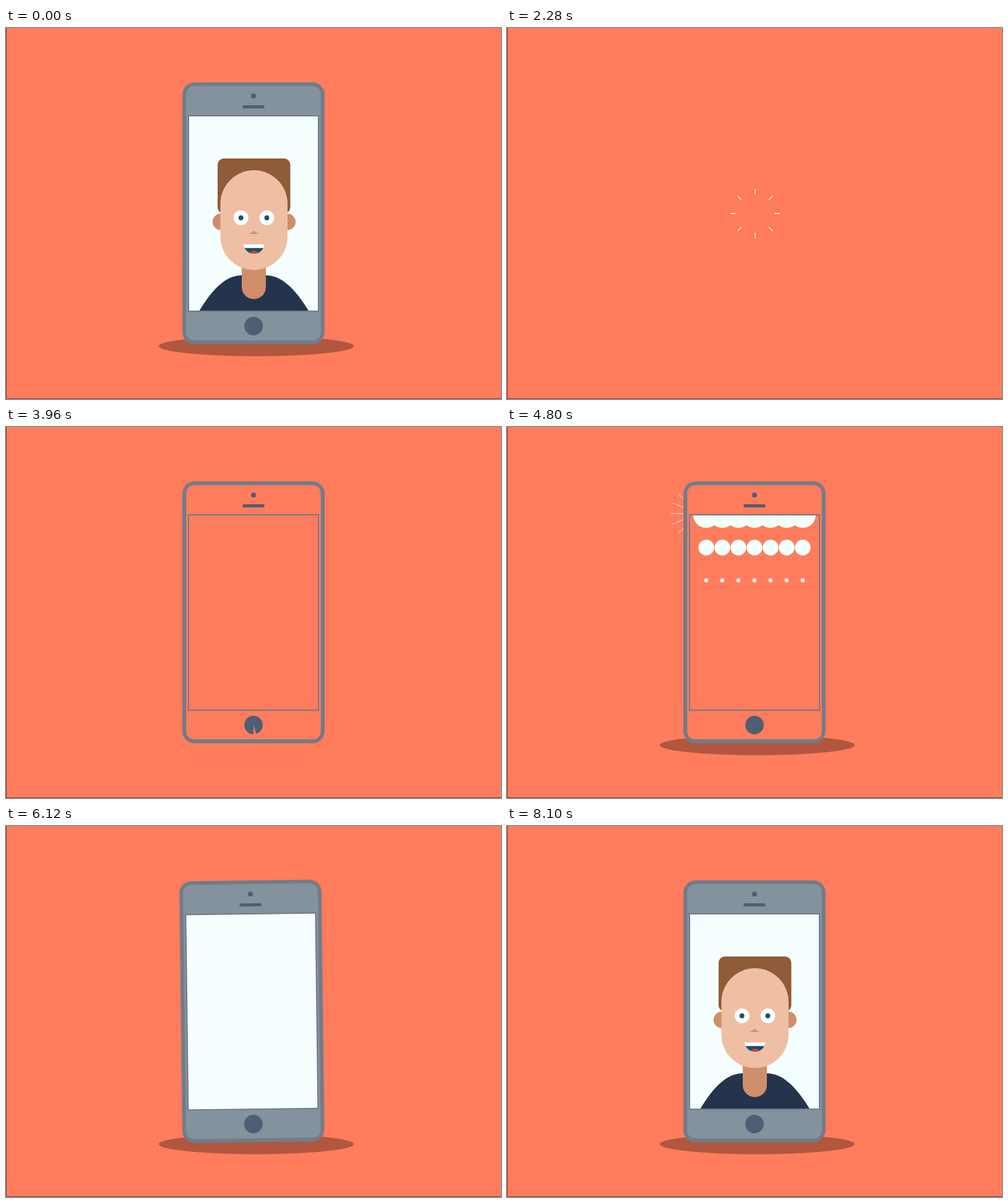
An HTML page without scripts that plays this animation: 800x600 px, repeating every 8.13 s.

```html
<!DOCTYPE html>
<html lang="en">
<head>
<meta charset="utf-8">
<title>Phone selfie loop</title>
<style>
html, body { margin: 0; width: 100%; height: 100%; overflow: hidden; background: #ff7c5c; }
svg { display: block; width: 800px; height: 600px; }
svg * { animation-duration: 8130ms; animation-iteration-count: infinite; animation-timing-function: linear; }
.line { fill: none; stroke: #707c89; }
.part { fill: #4d5f74; }

/* phone: crouch, launch, reset, hop */
#phone { transform-origin: 400px 511px; animation-name: phone; }
@keyframes phone {
  0%, 4.8% { transform: translateY(0) rotate(0deg); animation-timing-function: ease-in-out; }
  10.4% { transform: translateY(17px) rotate(0deg); animation-timing-function: ease-in; }
  13.28% { transform: translateY(-402px) rotate(0deg); }
  14.2%, 27% { transform: translateY(-560px) rotate(0deg); }
  27.01%, 63% { transform: translateY(0) rotate(0deg); }
  64.94% { transform: translateY(0) rotate(.2deg); }
  68.3% { transform: translateY(0) rotate(.5deg); animation-timing-function: ease-out; }
  71.3% { transform: translateY(-20px) rotate(4.6deg); animation-timing-function: ease-in-out; }
  74.4% { transform: translateY(0) rotate(-1.6deg); animation-timing-function: ease-in-out; }
  76.5% { transform: translateY(0) rotate(.8deg); }
  78.6%, 100% { transform: translateY(0) rotate(0deg); }
}
#shadow { transform-origin: 404.5px 514.5px; animation-name: shadow; }
@keyframes shadow {
  0%, 10.4% { transform: scale(1); animation-timing-function: ease-in; }
  13.28% { transform: scale(.226); }
  14%, 52% { transform: scale(0); animation-timing-function: ease-out; }
  57.8%, 100% { transform: scale(1); }
}

/* outlines */
#dashes { stroke-width: 5.6px; animation-name: dashes; }
@keyframes dashes {
  0%, 18.4% { stroke-dasharray: 20 0; }
  18.45%, 31% { stroke-dasharray: 0 20; }
  34.69% { stroke-dasharray: 10 10; }
  37.2%, 100% { stroke-dasharray: 20 0; }
}
#inner { transform-origin: 400px 300px; stroke-width: 4.6px; animation-name: inner; }
@keyframes inner {
  0%, 18.4% { stroke-dasharray: 1 2; stroke-dashoffset: 0; transform: scale(1.014, 1.014); }
  18.45%, 28% { stroke-dasharray: 1 2; stroke-dashoffset: 1.01; transform: scale(1); animation-timing-function: ease-in-out; }
  34.3%, 34.69% { stroke-dasharray: 1 2; stroke-dashoffset: 0; transform: scale(1); }
  37.2%, 100% { stroke-dasharray: 1 2; stroke-dashoffset: 0; transform: scale(1.014, 1.014); }
}
#echo { transform-origin: 400px 300px; opacity: 0; animation-name: echo; }
@keyframes echo {
  0%, 33.2% { opacity: 0; stroke-width: .3px; transform: rotate(28deg) scale(.3); }
  33.21% { opacity: 1; stroke-width: .3px; transform: rotate(28deg) scale(.3); }
  34.69% { opacity: 1; stroke-width: .9px; transform: rotate(22deg) scale(.55); }
  37.8% { opacity: 1; stroke-width: 2px; transform: rotate(16deg) scale(1); animation-timing-function: ease-in-out; }
  42.4% { opacity: 1; stroke-width: 5px; transform: rotate(0deg) scale(1); }
  42.41%, 100% { opacity: 0; stroke-width: 5px; transform: rotate(0deg) scale(1); }
}
#frame { stroke-width: 2px; stroke-dasharray: 1 2; animation-name: frame; }
@keyframes frame {
  0%, 18.4% { stroke-dashoffset: 0; }
  18.45%, 38.5% { stroke-dashoffset: 1.01; animation-timing-function: ease-in-out; }
  45.5%, 100% { stroke-dashoffset: 0; }
}
.pop { transform-box: fill-box; transform-origin: center; animation-name: pop; }
@keyframes pop {
  0%, 18.4% { transform: scale(1); }
  18.45%, 42% { transform: scale(0); animation-timing-function: ease-out; }
  45.5% { transform: scale(1.15); }
  47%, 100% { transform: scale(1); }
}
#home { fill: none; stroke: #4d5f74; stroke-width: 15px; stroke-dasharray: 1 2; animation-name: home; }
@keyframes home {
  0%, 18.4% { stroke-dashoffset: 0; }
  18.45%, 43.5% { stroke-dashoffset: 1.01; }
  48.71% { stroke-dashoffset: .05; }
  49.1%, 100% { stroke-dashoffset: 0; }
}

/* fills made of rows of growing dots */
.dots { fill: none; stroke-linecap: round; animation-delay: var(--d, 0s); animation-fill-mode: backwards; }
.body { stroke: #84929e; stroke-dasharray: 0 51; animation-name: body; }
@keyframes body {
  0%, 18.4% { stroke-width: 86px; }
  18.45%, 61.25% { stroke-width: 0; }
  62.18% { stroke-width: 51px; }
  64.94% { stroke-width: 59px; }
  67.4%, 100% { stroke-width: 86px; }
}
.glass { stroke: #f6ffff; stroke-dasharray: 0 26; animation-name: glass; }
@keyframes glass {
  0%, 18.4% { stroke-width: 86px; }
  18.45%, 57.2% { stroke-width: 0; animation-timing-function: ease-out; }
  62.73%, 100% { stroke-width: 86px; }
}
.foot { stroke: #84929e; stroke-dasharray: 0 26.4; animation-name: foot; }
@keyframes foot {
  0%, 18.4% { stroke-width: 70px; }
  18.45%, 63% { stroke-width: 0; }
  64.94% { stroke-width: 29px; }
  68.3%, 100% { stroke-width: 70px; }
}

/* sparks */
.rays { fill: none; stroke: #fff; }
.burst { opacity: 0; stroke-width: .8px; animation-name: burst; animation-delay: var(--d); }
@keyframes burst {
  0% { opacity: 1; stroke-dasharray: 0 200; stroke-dashoffset: -10; }
  1.3% { opacity: .9; stroke-dasharray: 45 200; stroke-dashoffset: -25; }
  2.58% { opacity: .27; stroke-dasharray: 40 200; stroke-dashoffset: -53; }
  3.5%, 100% { opacity: 0; stroke-dasharray: 0 200; stroke-dashoffset: -93; }
}
.ticks { opacity: 0; stroke-width: .8px; animation-name: ticks; animation-delay: var(--d); }
@keyframes ticks {
  0% { opacity: 1; stroke-dasharray: 0 200; stroke-dashoffset: -8; }
  1.3% { opacity: .9; stroke-dasharray: 16 200; stroke-dashoffset: -22; }
  2.58% { opacity: .5; stroke-dasharray: var(--len) 200; stroke-dashoffset: var(--off); }
  3.5%, 100% { opacity: 0; stroke-dasharray: 0 200; stroke-dashoffset: -60; }
}
#big { stroke-width: 1.4px; animation-name: big; }
@keyframes big {
  0%, 27.3% { stroke-dasharray: 0 500; stroke-dashoffset: -20; }
  34.69% { stroke-dasharray: 87 500; stroke-dashoffset: -128.5; }
  37.2%, 100% { stroke-dasharray: 0 500; stroke-dashoffset: -234; }
}
.trail { opacity: 0; animation-name: trail; animation-delay: var(--d); }
@keyframes trail {
  0% { opacity: 1; stroke-dasharray: 0 400; stroke-dashoffset: 0; }
  .55% { opacity: 1; stroke-dasharray: 29 400; stroke-dashoffset: -27; }
  1.1% { opacity: 1; stroke-dasharray: 65 400; stroke-dashoffset: -73; }
  2.8% { opacity: 1; stroke-dasharray: 0 400; stroke-dashoffset: -200; }
  2.81%, 100% { opacity: 0; stroke-dasharray: 0 400; stroke-dashoffset: -200; }
}

/* flash and portrait */
.sweep { animation-name: sweep; }
@keyframes sweep {
  0%, 83% { transform: translateY(260px); animation-timing-function: ease-out; }
  85.98% { transform: translateY(0); }
  88.9%, 100% { transform: translateY(-140px); }
}
#dark { animation-name: dark; }
@keyframes dark { 0%, 83% { opacity: 0; } 83.01%, 85.98% { opacity: 1; } 86.9%, 100% { opacity: 0; } }
#veil { animation-name: veil; }
@keyframes veil { 0%, 83% { opacity: 0; } 83.01%, 85.98% { opacity: .9; } 88.9%, 100% { opacity: 0; } }
#face { animation-name: face; }
@keyframes face {
  0%, 18.4% { transform: translateY(0); }
  18.45%, 83.5% { transform: translateY(300px); }
  85.98% { transform: translateY(184px); animation-timing-function: ease-out; }
  88.93% { transform: translateY(-50px); animation-timing-function: ease-in-out; }
  91.6% { transform: translateY(12px); animation-timing-function: ease-in-out; }
  94.2% { transform: translateY(-5px); animation-timing-function: ease-in-out; }
  97%, 100% { transform: translateY(0); }
}
</style>
</head>
<body>
<svg viewBox="0 0 800 600">
  <defs>
    <path id="cross" d="M0 0H93M0 0H-93M0 0V93M0 0V-93"/>
    <g id="star8"><use href="#cross"/><use href="#cross" transform="rotate(45)"/></g>
    <g id="star16"><use href="#star8"/><use href="#star8" transform="rotate(22.5)"/></g>
    <path id="wide" d="M0 0H234M0 0H-234M0 0V234M0 0V-234"/>
    <path id="bodyRow" d="M274 0H529.1"/>
    <path id="glassRow" d="M322 0H478.1"/>
    <path id="slant" d="M290 220.7L510 268.3V900H290Z"/>
    <rect id="shell" x="288" y="90.8" width="224" height="418" rx="17"/>
    <clipPath id="inShell"><use href="#shell"/></clipPath>
    <clipPath id="inGlass"><rect x="295" y="142" width="210" height="316"/></clipPath>
  </defs>

  <rect width="800" height="600" fill="#ff7c5c"/>
  <ellipse id="shadow" cx="404.5" cy="514.5" rx="157.5" ry="16.3" fill="#b1573f"/>

  <g class="rays">
    <g transform="translate(399 467)"><use class="burst" href="#star16" style="--d:870ms"/></g>
    <g transform="translate(309 141)"><use class="burst" href="#star16" style="--d:4020ms"/></g>
    <g transform="translate(500 487)"><use class="burst" href="#star16" style="--d:4260ms"/></g>
    <g transform="translate(309 140)"><use class="burst" href="#star16" style="--d:4740ms"/></g>
    <g transform="translate(501 160)"><use class="burst" href="#star16" style="--d:4890ms"/></g>
    <g transform="translate(491 501)">
      <use class="burst" href="#star16" style="--d:5070ms"/>
      <g transform="rotate(11.25)"><use class="ticks" href="#star16" style="--d:5070ms;--len:10;--off:-47"/></g>
    </g>
    <path class="trail" d="M425.8 506V306" stroke-width="1.8" style="--d:990ms"/>
    <path class="trail" d="M399 506V306" stroke-width="5.5" style="--d:1035ms"/>
    <path class="trail" d="M366 506V306" stroke-width="8" style="--d:1075ms"/>
  </g>

  <g id="phone">
    <use href="#shell" fill="#ff7c5c"/>
    <g clip-path="url(#inShell)">
      <g transform="translate(0 115)"><use class="dots body" href="#bodyRow"/></g>
      <g transform="translate(0 168)"><use class="dots body" href="#bodyRow" style="--d:75ms"/></g>
      <g transform="translate(0 221)"><use class="dots body" href="#bodyRow" style="--d:150ms"/></g>
      <g transform="translate(0 274)"><use class="dots body" href="#bodyRow" style="--d:225ms"/></g>
      <g transform="translate(0 327)"><use class="dots body" href="#bodyRow" style="--d:300ms"/></g>
      <g transform="translate(0 380)"><use class="dots body" href="#bodyRow" style="--d:375ms"/></g>
      <g transform="translate(0 433)"><use class="dots body" href="#bodyRow" style="--d:450ms"/></g>
      <g transform="translate(0 486)"><use class="dots body" href="#bodyRow" style="--d:525ms"/></g>
      <path class="dots foot" d="M334 484H466.1"/>
    </g>

    <g clip-path="url(#inGlass)">
      <g transform="translate(0 142)"><use class="dots glass" href="#glassRow"/></g>
      <g transform="translate(0 195)"><use class="dots glass" href="#glassRow" style="--d:65ms"/></g>
      <g transform="translate(0 248)"><use class="dots glass" href="#glassRow" style="--d:130ms"/></g>
      <g transform="translate(0 301)"><use class="dots glass" href="#glassRow" style="--d:195ms"/></g>
      <g transform="translate(0 354)"><use class="dots glass" href="#glassRow" style="--d:260ms"/></g>
      <g transform="translate(0 407)"><use class="dots glass" href="#glassRow" style="--d:325ms"/></g>
      <g transform="translate(0 460)"><use class="dots glass" href="#glassRow" style="--d:390ms"/></g>
      <g id="dark"><use class="sweep" href="#slant" fill="#60606f"/></g>

      <g id="face">
        <path d="M312 458C334 421 356 400 381 400H420C445 400 467 421 489.500 458V560H312Z" fill="#25344d"/>
        <path d="M381 370H420V419A19.500 19.500 0 0 1 381 419Z" fill="#cf8e6b"/>
        <rect x="342" y="211" width="117.500" height="89" rx="10" fill="#8f5b38"/>
        <circle cx="347" cy="313.500" r="13.200" fill="#cf8e6b"/>
        <circle cx="454.800" cy="313.500" r="13.200" fill="#cf8e6b"/>
        <rect x="346.500" y="230" width="108.500" height="161.500" rx="54.250" fill="#efbfa4"/>
        <g fill="#fff"><circle cx="379.700" cy="307" r="11.900"/><circle cx="421.500" cy="307" r="11.900"/></g>
        <g fill="#0b5577"><circle cx="379.700" cy="307" r="3.900"/><circle cx="421.500" cy="307" r="3.900"/></g>
        <path d="M392 333Q397 331 400.500 328Q404 331 409 333Z" fill="#cf8e6b"/>
        <path d="M385.500 355.500H416C413 362 407 365 400.700 365S388.500 362 385.500 355.500Z" fill="#0b5577"/>
        <path d="M393.800 363.500A7.500 5.500 0 0 1 407.600 363.500Q400.700 366.300 393.800 363.500Z" fill="#dd4128"/>
        <path d="M384 350H417.500L416 355.800H385.500Z" fill="#fff"/>
      </g>
      <g id="veil"><use class="sweep" href="#slant" fill="#fff"/></g>
    </g>

    <rect id="frame" class="line" x="295" y="142" width="210" height="316" pathLength="1"/>
    <rect id="inner" class="line" x="290.300" y="94.500" width="219.400" height="410" rx="14" pathLength="1"/>
    <use id="dashes" class="line" href="#shell"/>
    <circle class="part pop" cx="400" cy="110" r="4"/>
    <rect class="part pop" x="382.300" y="125" width="35.400" height="5" rx="2"/>
    <circle id="home" cx="400" cy="482" r="7.500" pathLength="1" transform="rotate(90 400 482)"/>
  </g>

  <use id="echo" class="line" href="#shell"/>
  <g class="rays" transform="translate(401 300)">
    <g id="big"><use href="#wide"/><use href="#wide" transform="rotate(45)"/></g>
  </g>
  <g class="rays" transform="translate(399 107.500)">
    <use class="burst" href="#star16" style="--d:6780ms"/>
    <use class="ticks" href="#star8" style="--d:6780ms;--len:1.2;--off:-38"/>
  </g>
  <path d="M.5 0V599.500H800" fill="none" stroke="#7d3d2e"/>
</svg>
</body>
</html>
```
